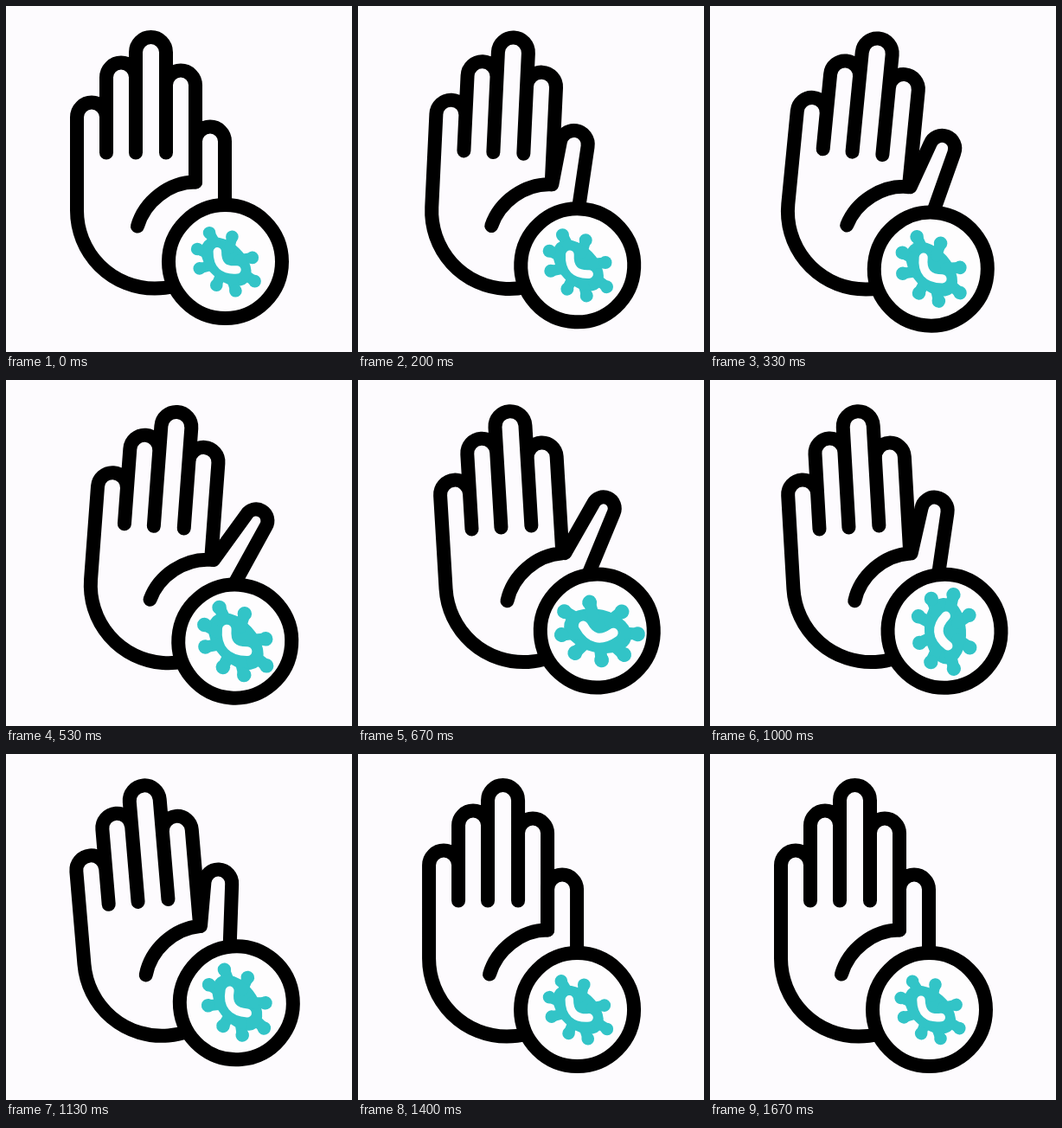
Recreate the animation shown at these times as an HTML page. Size 400 by 400 pixels, loop 1.74 s.

```html
<!DOCTYPE html>
<html lang="en">
<head>
<meta charset="utf-8">
<title>Waving hand with germ</title>
<style>
  html, body { margin: 0; width: 100%; height: 100%; overflow: hidden; background: #fdfbfe; }
  svg { display: block; width: 100vw; height: 100vh; }
  .line { fill: none; stroke: #000; stroke-width: 16; stroke-linecap: round; stroke-linejoin: round; }
</style>
</head>
<body>
<svg viewBox="0 0 400 400">
  <g id="hand">
    <path class="line" d="M195 323Q184 326 172 326A90 90 0 0 1 82 236V128A17 17 0 0 1 116 128V169
      M116 128V82A17 17 0 0 1 150 82V169
      M150 82V53A17.5 17.5 0 0 1 185 53V169
      M185 91A17 17 0 0 1 219 91V203C188 203 160 226 152 254"/>
    <path class="line" id="thumb"/>
    <circle class="line" cx="253.5" cy="295" r="65.5" style="fill:#fefdfe"/>
    <g id="germ" fill="#32c4c7" stroke-linecap="round">
      <ellipse rx="40" ry="25"/>
      <g id="spikes" stroke="#32c4c7" stroke-width="14"/>
      <path d="M-18 -2Q0 18 18 -2" fill="none" stroke="#fefdfe" stroke-width="11"/>
    </g>
  </g>
</svg>
<script>
const LOOP = 1740, STEPS = 26, STEP = LOOP / STEPS;
const byId = id => document.getElementById(id);
const hand = byId('hand'), thumb = byId('thumb'), germ = byId('germ');

const knobs = [[-43, -13], [-17, -30], [22, -28], [46, -7], [36, 20], [12, 32], [-20, 31], [-40, 14]];
byId('spikes').innerHTML = knobs.map(([x, y]) =>
  `<path d="M${x / 2} ${y / 2}L${x} ${y}"/><circle cx="${x}" cy="${y}" r="8.5" stroke="none"/>`).join('');

// Tracks list [time, value] turning points, joined by cosine easing.
const SHIFT = [[0, 0], [760, 20], [1430, 0]];
const TILT = [[0, 0], [450, .115], [735, -.085], [870, .112], [1060, -.1], [1360, 0]];
const SPREAD = [[0, 0], [640, 1], [900, .5], [1400, 0]];

function track(keys, t) {
  const i = keys.findIndex(([time]) => time > t);
  if (i < 0) return keys[keys.length - 1][1];
  const [t0, a] = keys[i - 1], [t1, b] = keys[i];
  return a + (b - a) * (1 - Math.cos(Math.PI * (t - t0) / (t1 - t0))) / 2;
}

function thumbPath(u) {
  const x = 236 + 29 * u + 5 * u * u, y = 156 - 2 * u;
  const r = 17 - 4 * u, dx = r * Math.cos(u / 2), dy = r * Math.sin(u / 2);
  return `M${219 + 3 * u} 203L${x - dx} ${y - dy}A${r} ${r} 0 0 1 ${x + dx} ${y + dy}L${253 - 10 * u} 238`;
}

// One full turn: quick start, slow settling.
const spin = t => 43 - 362 * Math.exp(-Math.exp((780 - t) / 115));

function draw(now) {
  const t = Math.floor((now % LOOP + 8) / STEP) % STEPS * STEP;
  const shift = track(SHIFT, t);
  const degrees = track(TILT, t) * 180 / Math.PI;
  hand.setAttribute('transform', `translate(${shift} .6) rotate(${degrees} 163 234)`);
  thumb.setAttribute('d', thumbPath(track(SPREAD, t)));
  germ.setAttribute('transform',
    `translate(254.5 295) rotate(${spin(t)}) scale(${.86 + shift * .007})`);
}

const start = performance.now();
function tick() {
  draw(performance.now() - start);
  requestAnimationFrame(tick);
}
tick();
</script>
</body>
</html>
```
